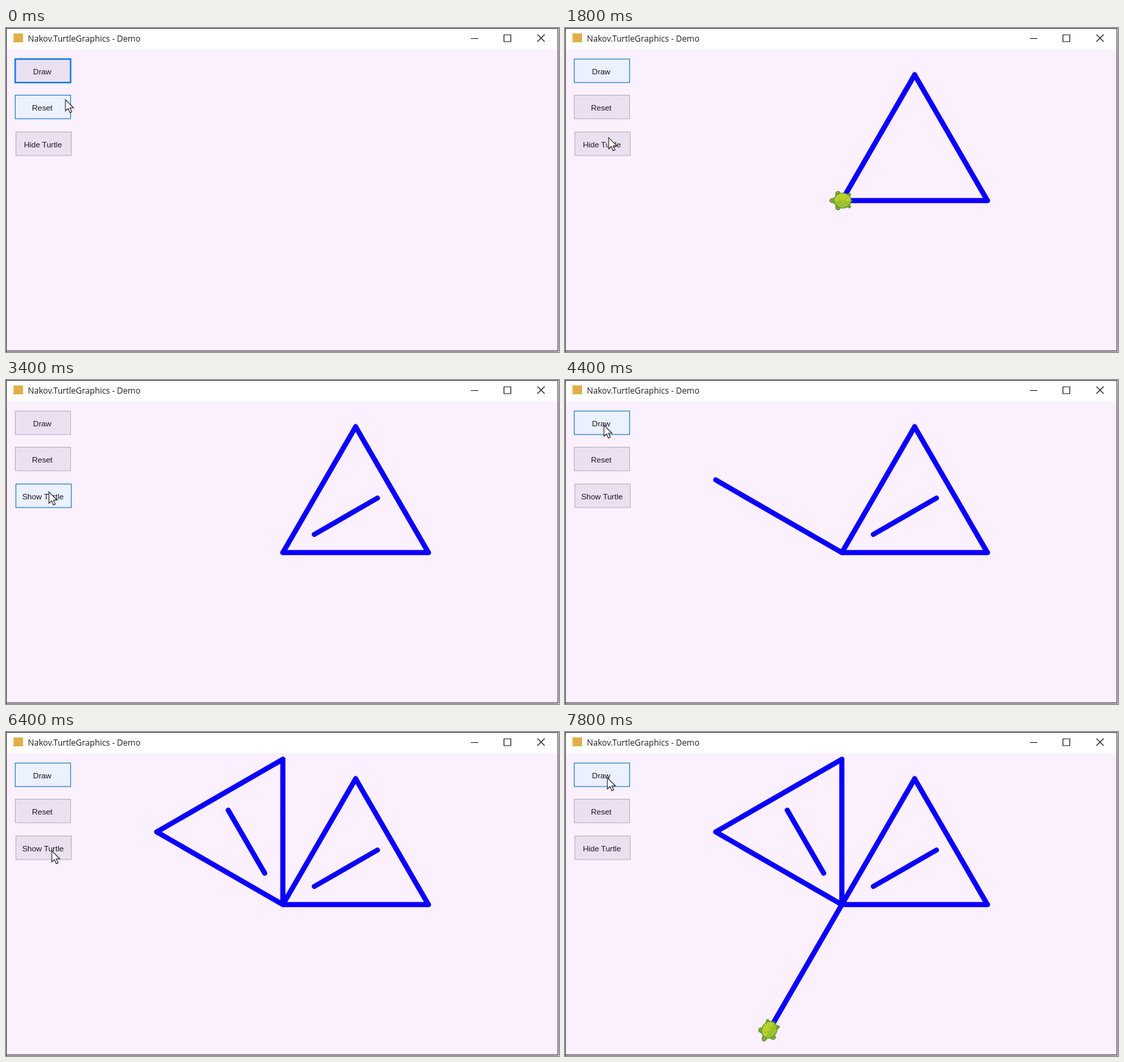
Animation, 809 px wide and 475 px high, one loop 8000 ms. Source, as an HTML page:

```html
<!DOCTYPE html>
<html lang="en">
<head>
<meta charset="utf-8">
<title>Turtle graphics demo</title>
<style>
  html, body { margin: 0; width: 100%; height: 100%; overflow: hidden; background: #faf0fe; }
  svg { display: block; width: 100vw; height: 100vh; }
  .title { font: 12.2px "Open Sans", sans-serif; fill: #211b27; }
  .button text { font: 11.5px "Liberation Sans", Arial, sans-serif; fill: #1b1622; text-anchor: middle; }
  .button rect { fill: #ebe0f0; stroke: #b9b0c1; stroke-width: 1; }
  .button.focused rect { stroke: #0a7ad8; stroke-width: 2.2; }
  .button.hot rect { fill: #ebf1fe; stroke: #2f86c6; stroke-width: 1.2; }
  .frame { fill: none; stroke: #57475f; stroke-width: 1.3; }
  .controls { fill: none; stroke: #29222e; stroke-width: 1.2; }
  #trail { fill: none; stroke: #0b00fa; stroke-width: 7.5; stroke-linecap: round; stroke-linejoin: round; }
  .limb { fill: #7fac38; stroke: #4d7a28; stroke-width: .8; }
</style>
</head>
<body>
<svg viewBox="0 0 809 475">
  <rect width="809" height="475" fill="#faf0fe"/>
  <rect width="809" height="31.5" fill="#fff"/>
  <rect x="11" y="8" width="14" height="13" fill="#e0b04a"/>
  <text class="title" x="32" y="20">Nakov.TurtleGraphics - Demo</text>
  <path class="controls" d="M680 15.5h11M728.5 10h10v10h-10zM777.5 9.5l10.5 10.5m0-10.5l-10.5 10.5"/>

  <g id="buttons"></g>
  <path id="trail"/>

  <g id="turtle">
    <g class="limb">
      <path d="M-3.5-10C-4-15-2-18 0-18S4-15 3.5-10z"/>
      <path d="M-7-9L-12-9Q-15-6-13-3L-9-3z"/>
      <path d="M7-9L12-9Q15-6 13-3L9-3z"/>
      <path d="M-8 5L-11 11Q-10 14-8 13L-4 9z"/>
      <path d="M8 5L11 11Q10 14 8 13L4 9z"/>
      <path d="M-2 11L0 16L2 11z"/>
    </g>
    <ellipse cy="1" rx="11" ry="12.5" fill="#b9d22c"/>
    <path d="M0-11.5A11 12.5 0 0 0 0 13.5Q-3 1 0-11.5z" fill="#98c22e"/>
    <path d="M-5-6L0-3L5-6M-5 7L0 4L5 7M0-3V4" fill="none" stroke="#8db02c" stroke-width=".8"/>
    <ellipse cy="1" rx="11" ry="12.5" fill="none" stroke="#5c8c26" stroke-width="1.1"/>
  </g>

  <path class="frame" d="M.5 475V.5H807.5V473.5H.5"/>
  <path id="cursor" d="M0 0V16.5L3.9 13L6.5 19L9.2 17.9L6.6 12H11.8z" fill="#fff" stroke="#2b2530" stroke-width="1.1"/>
</svg>

<script>
const LOOP = 8000, TICK = 200, STEP = 218, SCALE = 1.065;
const HIDE = 3300, SHOW = 6800;
const drawStarts = [690, 4120, 7560];
const $ = id => document.getElementById(id);

// One press of Draw: a triangle and a line inside it.
const program = [
  ['turn', 30], ['go', 200], ['turn', 120], ['go', 200], ['turn', 120], ['go', 200],
  ['turn', -30], ['hop', -50], ['go', -100], ['hop', 150], ['turn', 30]
];

// Mouse positions as [time, x, y].
const mouse = [
  [0, 87, 105], [550, 75, 66], [1000, 75, 66], [1700, 64, 160], [2200, 63, 167],
  [3350, 63, 167], [3850, 57, 66], [4700, 57, 66], [5700, 67, 174],
  [6850, 67, 174], [7350, 62, 67], [LOOP, 62, 67]
];

const buttons = [['Draw', 13.5, 45.5], ['Reset', 13.5, 98.5], ['Hide Turtle', 14.5, 152.5]]
  .map(([label, x, y]) => {
    $('buttons').insertAdjacentHTML('beforeend',
      `<g class="button"><rect x="${x}" y="${y}" width="81" height="34.5"/>` +
      `<text x="${x + 39.5}" y="${y + 22}">${label}</text></g>`);
    const node = $('buttons').lastElementChild;
    return { x, y, node, text: node.querySelector('text') };
  });

function mouseAt(t) {
  const i = mouse.findIndex(p => p[0] > t);
  const [t0, x0, y0] = mouse[i - 1], [t1, x1, y1] = mouse[i];
  const u = (t - t0) / (t1 - t0), k = u * u * (3 - 2 * u);
  return [x0 + (x1 - x0) * k, y0 + (y1 - y0) * k];
}

function turtleAt(t) {
  let x = 405, y = 253, angle = 0, trail = '';
  for (const start of drawStarts) {
    const done = Math.max(0, Math.floor((t - start) / STEP) + 1);
    for (const [op, amount] of program.slice(0, done)) {
      if (op === 'turn') { angle += amount; continue; }
      const a = angle * Math.PI / 180, from = `M${x} ${y}`;
      x += Math.sin(a) * amount * SCALE;
      y -= Math.cos(a) * amount * SCALE;
      if (op === 'go') trail += `${from}L${x} ${y}`;
    }
  }
  return { x, y, angle, trail };
}

function render(t) {
  const hidden = t >= HIDE && t < SHOW;
  const { x, y, angle, trail } = turtleAt(t);
  $('trail').setAttribute('d', trail);
  $('turtle').setAttribute('transform', `translate(${x} ${y}) rotate(${angle})`);
  $('turtle').setAttribute('visibility', hidden || t < drawStarts[0] ? 'hidden' : 'visible');

  const [mx, my] = mouseAt(t);
  $('cursor').setAttribute('transform', `translate(${mx} ${my})`);

  // While drawing, the window is blocked and Draw stays lit.
  const busy = drawStarts.some(s => t >= s - 100 && t < s + STEP * program.length);
  const focus = (t >= HIDE && t < 4000) || (t >= SHOW && t < 7400) ? 2 : 0;
  buttons.forEach((b, i) => {
    const over = mx >= b.x && mx <= b.x + 81 && my >= b.y && my <= b.y + 34.5;
    b.node.classList.toggle('hot', busy ? i === 0 : over);
    b.node.classList.toggle('focused', i === focus);
  });
  buttons[2].text.textContent = hidden ? 'Show Turtle' : 'Hide Turtle';
}

const began = performance.now();
function frame() {
  const t = (performance.now() - began) % LOOP;
  render(Math.floor(t / TICK) * TICK);
  requestAnimationFrame(frame);
}
frame();
</script>
</body>
</html>
```
